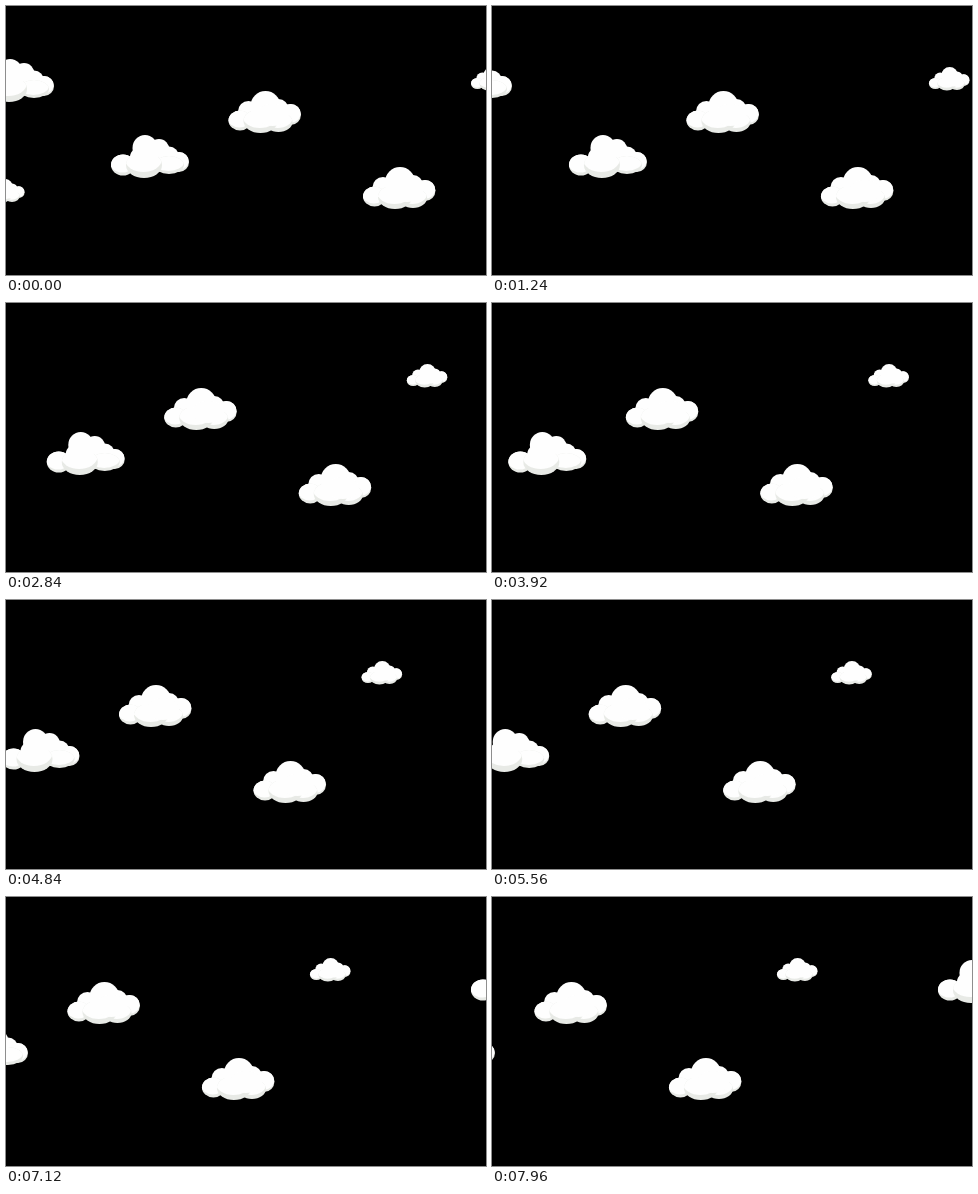
These frames come from a looping animation (480x269 px, 8000 ms). An HTML page with a canvas:

```html
<!DOCTYPE html>
<html lang="en">
<head>
<meta charset="utf-8">
<title>Drifting clouds</title>
<style>
  html, body { margin: 0; width: 100%; height: 100%; overflow: hidden; background: #000; }
  canvas { display: block; width: 480px; height: 269px; }
</style>
</head>
<body>
<canvas id="sky" width="480" height="269"></canvas>
<script>
const ctx = document.getElementById('sky').getContext('2d');
const LOOP = 8000;
const FRAME = 40;
const SPEED = 19 / 840; // pixels per ms

// Puffs from back to front: x, y, rx, ry, depth of the shaded underside
const broad = [
  [62, 23.5, 10.5, 10.5, 2],
  [50, 18, 10, 10, 0],
  [20, 20.5, 10.5, 10.5, 0],
  [11.5, 29.5, 11.5, 10, 3],
  [50, 31, 14, 10, 4],
  [32, 30, 17, 12, 5],
  [37, 15, 15, 15, 0],
  [44, 24, 16, 11, 0]
];
const tall = [
  [68, 27, 10, 10, 2],
  [58, 21.5, 10, 10, 0],
  [48, 15, 10.5, 11, 0],
  [12, 30, 12, 10.5, 3],
  [58, 30, 15, 9, 3],
  [33, 30, 18, 13, 6],
  [34, 13, 12.5, 13, 0],
  [33, 22, 14, 11, 0]
];

// Left and top edge at the start of the loop
const clouds = [
  { shape: tall, x: -30, y: 53, scale: 1 },
  { shape: broad, x: 222.5, y: 85, scale: 1 },
  { shape: tall, x: 105, y: 129, scale: 1 },
  { shape: broad, x: 357, y: 161, scale: 1 },
  { shape: broad, x: 465, y: 61, scale: 0.56 },
  { shape: broad, x: -22, y: 173, scale: 0.56 },
  { shape: tall, x: 626, y: 63, scale: 1 }
];

function ellipse(x, y, rx, ry, color) {
  ctx.beginPath();
  ctx.ellipse(x, y, rx, ry, 0, 0, Math.PI * 2);
  ctx.fillStyle = color;
  ctx.fill();
}

function drawPuff([x, y, rx, ry, shade]) {
  ctx.save();
  ellipse(x, y, rx, ry, shade ? '#e8eae6' : '#fefefe');
  if (shade) {
    ctx.clip();
    ellipse(x - 0.6, y - shade, rx + 0.5, ry, '#fefefe');
  }
  ctx.restore();
}

function draw(time) {
  ctx.fillStyle = '#000';
  ctx.fillRect(0, 0, 480, 269);
  for (const { shape, x, y, scale } of clouds) {
    ctx.save();
    ctx.translate(x - time * SPEED, y);
    ctx.scale(scale, scale);
    shape.forEach(drawPuff);
    ctx.restore();
  }
}

function tick() {
  const time = performance.now() % LOOP;
  draw(Math.floor(time / FRAME) * FRAME);
  requestAnimationFrame(tick);
}
tick();
</script>
</body>
</html>
```
